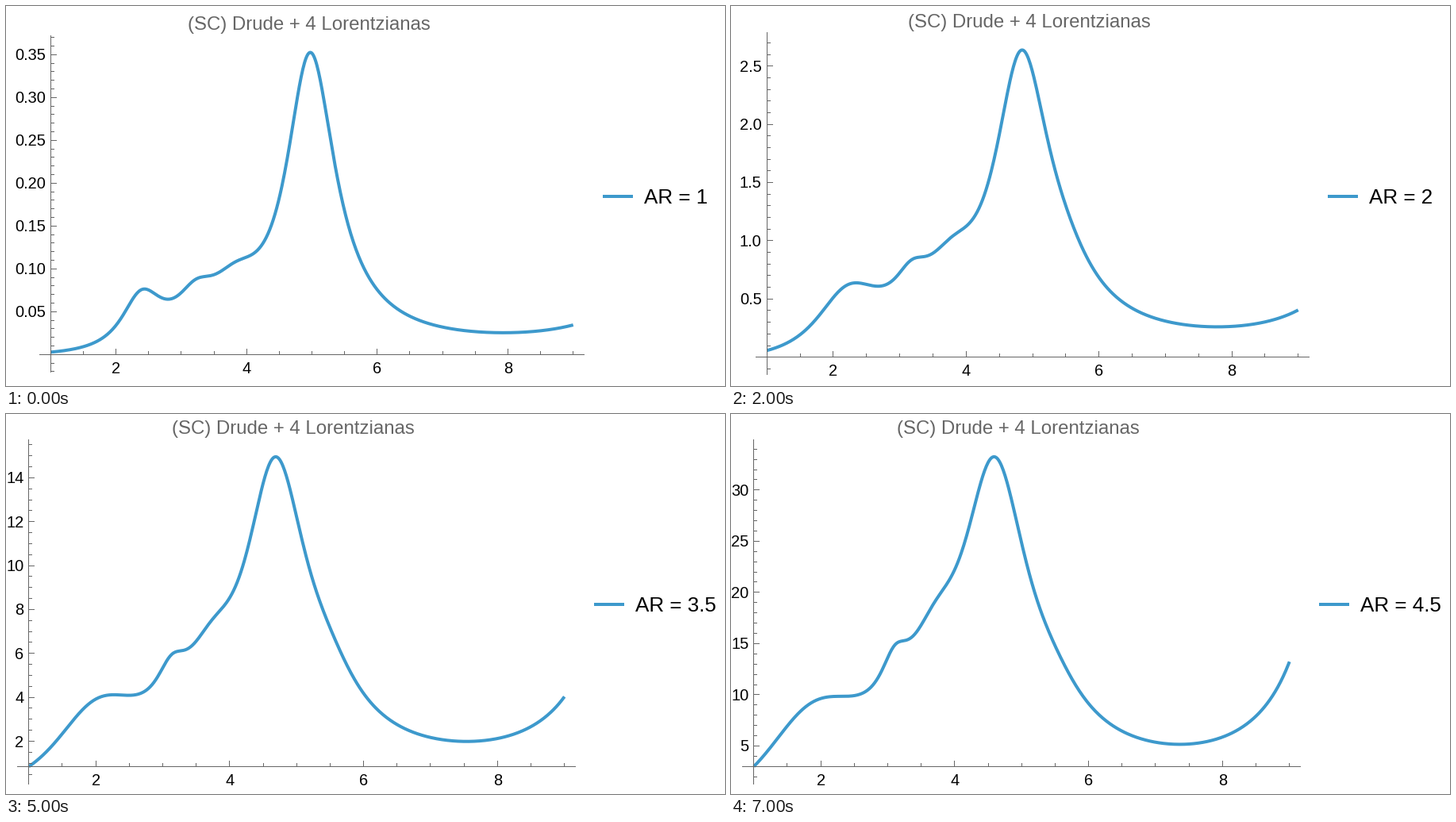
Animation, 906 px wide and 479 px high, one loop 8000 ms. Source, as a matplotlib script:

```python
import math

import matplotlib.pyplot as plt
import numpy as np
from matplotlib.animation import FuncAnimation

W, H, DPI = 906, 479, 64
PT = 72 / DPI  # points per pixel
BLUE, GREY = (0.24, 0.6, 0.8), "#666666"
FRAMES = 8
ENERGY = np.linspace(1, 9, 600)

# Resonances as (at AR 1, at AR 4.5) pairs: centre, width, strength;
# the last number swells the strength in between
RESONANCES = [
    ((2.40, 2.02), (0.78, 2.15), (0.176, 0.26), 0),
    ((3.23, 3.11), (0.75, 0.55), (0.114, 0.13), 0),
    ((3.85, 3.72), (1.05, 1.05), (0.148, 0.22), 0),
    ((4.98, 4.61), (0.92, 1.20), (0.945, 0.845), 0),
    ((5.50, 5.50), (1.10, 1.10), (0, 0.065), 0.25),
    ((11.49, 10.39), (0.50, 0.50), (9.3, 12.96), 0),
]


def mix(pair, w):
    return pair[0] + (pair[1] - pair[0]) * w


def peak_value(ratio):
    q = math.log(ratio)
    return 0.3525 * math.exp(2.76 * q + 0.235 * q**2 - 0.04 * q**3)


def spectrum(ratio):
    """Sum of damped oscillators, scaled to the peak value."""
    w = ((ratio - 1) / 3.5) ** 0.8
    total = 0
    for centre, width, strength, swell in RESONANCES:
        damping = (mix(width, w) * ENERGY) ** 2
        detuning = (mix(centre, w) ** 2 - ENERGY**2) ** 2
        amount = mix(strength, w) + swell * w * (1 - w)
        total = total + amount * damping / (detuning + damping)
    return peak_value(ratio) * total / total.max()


def tick_scheme(peak):
    """Label step, minor ticks per label and decimals for a value axis."""
    for e in range(-3, 3):
        for m in (1, 2, 5):
            step = m * 10.0**e
            if peak / step < 7.6:
                return step, 4 if m == 2 else 5, max(0, -e)


fig = plt.figure(figsize=(W / DPI, H / DPI), dpi=DPI, facecolor="white")
ax = fig.add_axes([0, 0, 1, 1])


def rule(x0, y0, x1, y1):
    # half a pixel back, so that snapping lands on the pixel centre
    ax.plot([x0 - 0.5, x1 - 0.5], [y0 - 0.5, y1 - 0.5], color=GREY, lw=PT, zorder=3)


def stroke(x, y):
    ax.plot(x, y, color=BLUE, lw=4 * PT, solid_capstyle="butt", solid_joinstyle="round")


def text(x, y, s, px, color="black"):
    ax.text(x, y, s, fontsize=px * PT, color=color, family="Liberation Sans",
            ha="left", va="baseline", zorder=4)


def digits_width(s):
    return 20 * sum(0.278 if c == "." else 0.556 for c in s)


def draw(frame):
    ratio = 1 + frame / 2
    values = spectrum(ratio)
    peak = values.max()
    origin = values[0] if values[0] > 0.026 * peak else 0
    step, per, decimals = tick_scheme(peak)

    # golden-ratio plot box, pushed right by the widest label
    shift = 11 if ratio == int(ratio) else 0
    widest = f"{math.floor(peak / step) * step:.{decimals}f}"
    left = digits_width(widest) + 6.5 + shift
    right = 703.7 + shift
    height = 0.618 * (right - left + 28)
    top, bottom = 249.4 - height / 2, 249.4 + height / 2
    axis = bottom - 22.2
    unit = (axis - top - 0.05 * height) / (peak - origin)

    def px(energy):
        return left + (energy - 1) * (right - left) / 8

    def py(value):
        return axis - (value - origin) * unit

    ax.clear()
    ax.set_axis_off()
    ax.set(xlim=(0, W), ylim=(H, 0))
    stroke(px(ENERGY), py(values))

    # axes
    rule(left, top, left, bottom)
    rule(left - 14, axis, right + 14, axis)
    for n in range(-2 * per, 9 * per):
        value = n * step / per
        y = py(value)
        if not top <= y <= bottom or value == origin:
            continue
        major = n % per == 0
        rule(left, y, left + (7 if major else 4), y)
        if major:
            label = f"{value:.{decimals}f}"
            text(left - 6.5 - digits_width(label), y + 7, label, 20)
    for n in range(3, 19):
        x = px(n / 2)
        major = n % 4 == 0
        rule(x, axis, x, axis - (7 if major else 4))
        if major:
            text(x - 5.6, axis + 23.7, str(n // 2), 20)

    # title and legend
    text((left + right) / 2 - 157, top - 7.2, "(SC) Drude + 4 Lorentzianas", 24, GREY)
    stroke([741 + shift, 779 + shift], [240, 240])
    text(793 + shift, 249, f"AR = {ratio:g}", 26)
    return []


anim = FuncAnimation(fig, draw, frames=FRAMES, interval=1000,
                     init_func=lambda: draw(0), repeat=True, repeat_delay=0)
plt.show()
```
